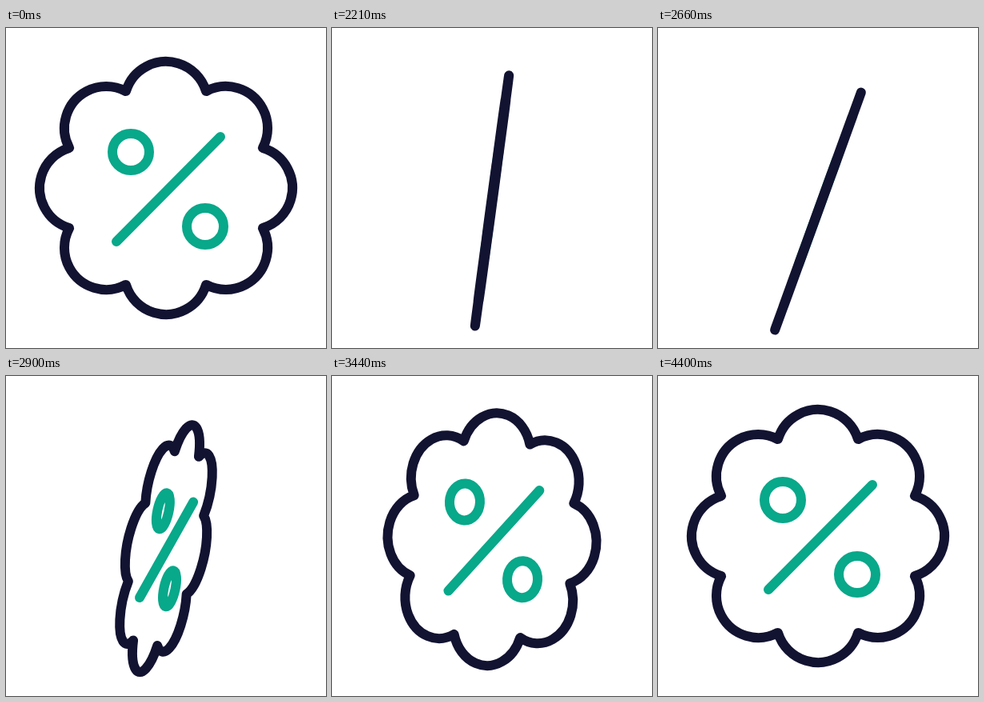
Animation, 400 px wide and 400 px high, one loop 4430 ms. Source, as an HTML page with a canvas:

```html
<!DOCTYPE html>
<html>
<head>
<meta charset="utf-8">
<style>
  html, body { margin: 0; width: 100%; height: 100%; overflow: hidden; background: #fff; }
  canvas { display: block; width: 400px; height: 400px; }
</style>
</head>
<body>
<canvas id="stage" width="400" height="400"></canvas>
<script>
const ctx = document.getElementById('stage').getContext('2d');
const LOOP = 4430, HOLD = 2030, STEP = 30, START = 2003, END = 4400;
const FLIP = 2400, EDGE = 2640;
const NAVY = '#121331', GREEN = '#08a88a';
const RAD = Math.PI / 180;

const clamp = v => Math.min(1, Math.max(0, v));
const progress = (t, from, to) => clamp((t - from) / (to - from));
const smooth = u => (1 - Math.cos(Math.PI * u)) / 2;

// cubic-bezier(x1, 0, x2, 1), solved by bisection
function bezier(u, x1, x2) {
  let lo = 0, hi = 1;
  for (let i = 0; i < 30; i++) {
    const p = (lo + hi) / 2, q = 1 - p;
    if (3 * q * q * p * x1 + 3 * q * p * p * x2 + p ** 3 < u) lo = p;
    else hi = p;
  }
  return lo * lo * (3 - 2 * lo);
}

// rises to a peak, then settles slowly back to rest
function swing(t, peakTime, x1) {
  return t < peakTime
    ? smooth(progress(t, START, peakTime))
    : 1 - bezier(progress(t, peakTime, END), x1, 0.02);
}

// one full flip, then edge-on, then a slow opening
function flipScale(t) {
  if (t < FLIP) return 1 - smooth(2 * progress(t, START, FLIP));
  if (t < EDGE) return 1 - smooth(progress(t, FLIP, EDGE));
  return bezier(progress(t, EDGE, END), 0.18, 0.07);
}

function pose(t) {
  if (t < HOLD || t >= END) return { scale: 1, drop: 0, tilt: 0 };
  return {
    scale: flipScale(t),
    drop: 34.5 * swing(t, 2440, 0.22),
    tilt: 20.8 * RAD * swing(t, 2500, 0.29)
  };
}

function badge() {
  const dist = 105.7, radius = 52.3, spread = 73 * RAD;
  for (let i = 0; i < 8; i++) {
    const a = i * Math.PI / 4;
    ctx.arc(dist * Math.cos(a), dist * Math.sin(a), radius, a - spread, a + spread);
  }
  ctx.closePath();
}

function ring(x, y) {
  ctx.moveTo(x + 23, y);
  ctx.arc(x, y, 23, 0, 2 * Math.PI);
  ctx.closePath();
}

function percent() {
  ctx.moveTo(-62, 67);
  ctx.lineTo(68, -64);
  ring(-44, -45);
  ring(49, 48);
}

// the path is transformed, the stroke keeps its even width
function outline(shape, color, { scale, drop, tilt }) {
  ctx.beginPath();
  ctx.save();
  ctx.translate(200, 200 + drop);
  ctx.rotate(tilt);
  ctx.scale(Math.max(scale, 0.001), 1);
  shape();
  ctx.restore();
  ctx.strokeStyle = color;
  ctx.stroke();
}

function draw(now) {
  let t = now % LOOP;
  if (t >= HOLD) t = HOLD + Math.floor((t - HOLD) / STEP) * STEP;
  const state = pose(t);
  ctx.fillStyle = '#fff';
  ctx.fillRect(0, 0, 400, 400);
  ctx.lineWidth = 12;
  ctx.lineCap = ctx.lineJoin = 'round';
  outline(percent, GREEN, state);
  outline(badge, NAVY, state);
}

const begin = performance.now();
function loop() {
  draw(performance.now() - begin);
  requestAnimationFrame(loop);
}
loop();
</script>
</body>
</html>
```
